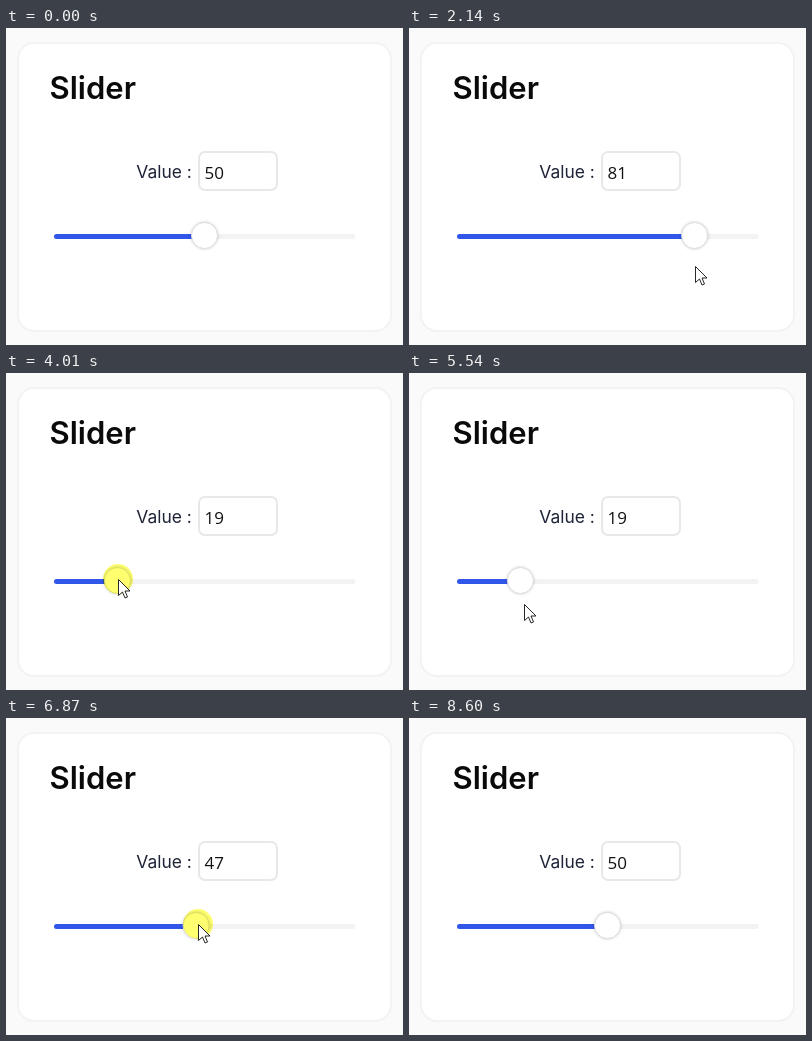
These frames come from a looping animation (397x317 px, 9130 ms). An HTML page:

```html
<!DOCTYPE html>
<html lang="en">
<head>
<meta charset="utf-8">
<title>Slider</title>
<style>
  html, body { margin: 0; width: 100%; height: 100%; overflow: hidden; background: #fafafa; }
  svg { display: block; }
  text { font-family: Inter, sans-serif; }
  #thumb { filter: drop-shadow(0 0 1.5px rgba(0, 0, 0, .2)); }
  #halo { fill: #ffff70; mix-blend-mode: multiply; }
</style>
</head>
<body>
<svg width="397" height="317" viewBox="0 0 397 317">
  <rect width="397" height="317" fill="#fafafa"/>
  <rect x="12" y="15" width="373" height="288" rx="16" fill="#fff" stroke="#f3f3f3" stroke-width="2"/>
  <text x="43.6" y="71" font-size="31" font-weight="600" fill="#0a0a0a">Slider</text>
  <text x="130.3" y="150" font-size="17.44" fill="#1e2338">Value :</text>
  <rect x="193" y="124" width="78" height="38" rx="6" fill="#fff" stroke="#e8e8e8" stroke-width="2"/>
  <text id="value" x="198.5" y="151" font-size="17" fill="#111" style="font-family: 'Open Sans', sans-serif">50</text>
  <rect x="48" y="206" width="301.5" height="5" rx="2.5" fill="#f3f3f3"/>
  <rect id="fill" x="48" y="206" width="150" height="5" rx="2.5" fill="#3056ea"/>
  <circle id="thumb" cy="207.5" r="13" fill="#fff" stroke="#dcdcdc"/>
  <circle id="halo" r="15"/>
  <path id="cursor" d="M0 0V16L4 12.5L6.5 18.5L9 17.5L6.5 11.5H11.5Z" fill="#fff" stroke="#111" stroke-width=".9"/>
</svg>
<script>
const LOOP = 9130;
const $ = id => document.getElementById(id);
const linear = u => u;
const easeOut = u => u * (2 - u);
const smooth = u => u * u * (3 - 2 * u);

// Each move: first step (ms), last step (ms), steps, cursor x, cursor y, value, easing
const start = { x: 342, y: 330, v: 50 };
const moves = [
  [140, 800, 10, 199, 216, 50, easeOut],
  [1000, 1270, 5, 253, 216, 67, linear],
  [1340, 1530, 4, 286, 216, 81, easeOut],
  [2000, 2200, 4, 286, 242, 81, smooth],
  [2340, 2340, 1, 286, 243, 81, linear],
  [2530, 3000, 8, 288, 211, 81, smooth],
  [3290, 4010, 11, 112, 206, 19, smooth],
  [4810, 5140, 6, 113, 240, 19, smooth],
  [5340, 5540, 4, 115, 231, 19, smooth],
  [5740, 5940, 4, 112, 206, 19, smooth],
  [6070, 6610, 9, 203, 206, 51, smooth],
  [6670, 6870, 4, 192, 206, 47, smooth],
  [6940, 7200, 5, 199, 207, 50, smooth],
  [8060, 8600, 9, 390, 330, 50, linear]
];
const presses = [[1000, 1800], [3220, 4540], [6010, 7670]];

function stateAt(t) {
  let s = start;
  for (const [from, to, steps, x, y, v, ease] of moves) {
    if (t < from) break;
    const step = t >= to ? steps : 1 + Math.floor((t - from) / (to - from) * (steps - 1));
    const u = ease(step / steps);
    const mix = (a, b) => a + (b - a) * u;
    s = { x: mix(s.x, x), y: mix(s.y, y), v: mix(s.v, v) };
    if (step < steps) break;
  }
  return s;
}

function draw(t) {
  const { x, y, v } = stateAt(t);
  const value = Math.round(v);
  const thumbX = 198.5 + (value - 50) * 2.81;
  const px = Math.round(x), py = Math.round(y);
  $('value').textContent = value;
  $('fill').setAttribute('width', thumbX - 48);
  $('thumb').setAttribute('cx', thumbX);
  $('cursor').setAttribute('transform', `translate(${px + .5} ${py + .5})`);
  $('halo').setAttribute('transform', `translate(${px} ${py})`);
  $('halo').style.display = presses.some(([a, b]) => t >= a && t < b) ? '' : 'none';
}

const t0 = performance.now();
function tick() {
  draw((performance.now() - t0) % LOOP);
  requestAnimationFrame(tick);
}
tick();
</script>
</body>
</html>
```
